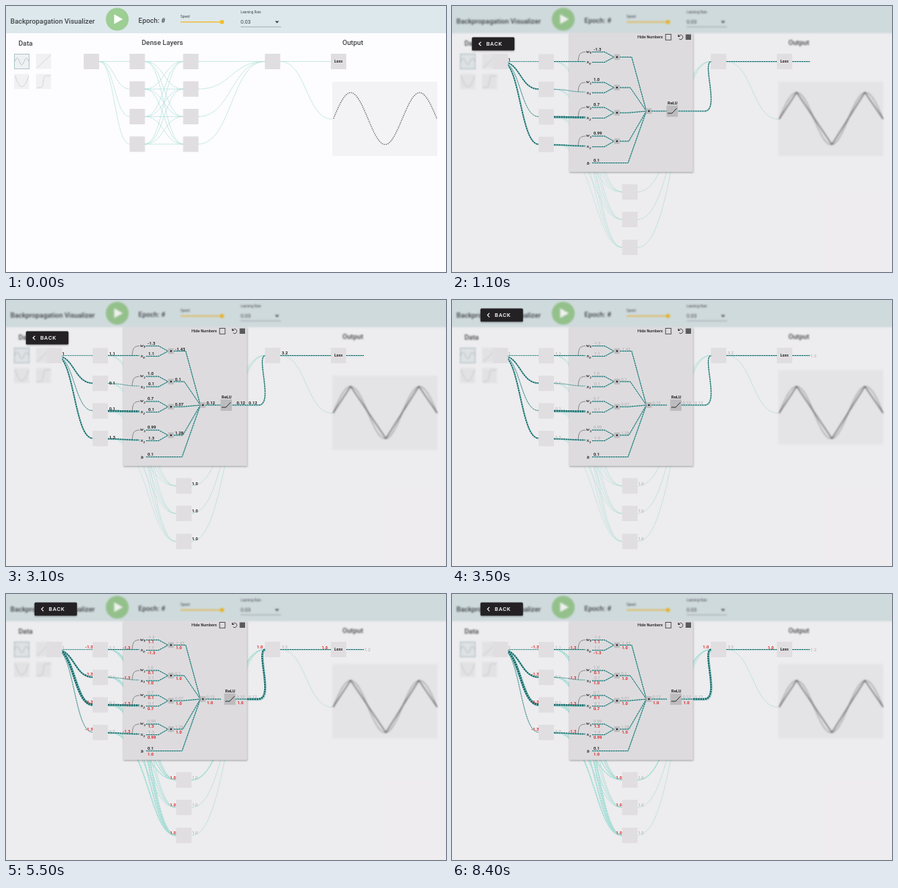
An HTML page that plays this animation: 600 px wide and 362 px high, repeating every 8.5 s.

```html
<!DOCTYPE html>
<html lang="en">
<head>
<meta charset="utf-8">
<title>Backpropagation Visualizer</title>
<style>
html, body { margin: 0; width: 100%; height: 100%; overflow: hidden; background: #fdfcfe; }
svg { position: absolute; left: 0; top: 0; width: 600px; height: 362px; overflow: visible; font-family: Roboto, sans-serif; }
text { fill: #414548; }
.h { font-size: 9.4px; font-weight: 500; }
.s { font-size: 4.5px; }
.n { font-size: 5.7px; font-weight: 700; fill: #222; }
.r { fill: #dc2727; }
.late .v { fill: #aaaaac; font-weight: 400; }
.m { font: italic 700 7px "Liberation Serif", serif; fill: #222; }
</style>
</head>
<body>
<svg id="page" viewBox="0 0 600 362"></svg>
<svg id="stage" viewBox="0 0 600 362"></svg>
<script>
const LOOP = 8500, ZOOM = 1100, BACKWARD = 3500;
const page = document.getElementById('page');
const stage = document.getElementById('stage');
const timed = [];

function add(parent, tag, attrs = {}, from = 0, to = LOOP) {
  const el = document.createElementNS('http://www.w3.org/2000/svg', tag);
  for (const k in attrs) el.setAttribute(k, attrs[k]);
  parent.append(el);
  if (from > 0 || to < LOOP) timed.push({ el, from, to });
  return el;
}
const group = (p, from, to) => add(p, 'g', {}, from, to);
const rect = (p, x, y, width, height, fill, more) => add(p, 'rect', { x, y, width, height, fill, ...more });
const path = (p, d, stroke, w = .8, more) => add(p, 'path', { d, stroke, 'stroke-width': w, fill: 'none', ...more });
const shape = (p, d, fill) => add(p, 'path', { d, fill });
function text(p, x, y, s, cls, from, to) {
  const el = add(p, 'text', { x, y, class: cls }, from, to);
  el.textContent = s;
  return el;
}
const node = (p, x, y, more) => rect(p, x - 10.5, y - 10.5, 21, 21, '#e0dee1', more);
const link = (x1, y1, x2, y2, m = (x1 + x2) / 2) => `M${x1} ${y1}C${m} ${y1} ${m} ${y2} ${x2} ${y2}`;
const faint = (p, d, w = .7) => path(p, d, '#a5ddd6', w, { 'stroke-dasharray': '3 .6' });
function wire(p, d, w = 1.1) {
  const shift = .3 + .3 * w;
  path(p, d, '#b3d6d5', w, { transform: `translate(${shift} ${shift})` });
  path(p, d, '#84bfbd', w);
  path(p, d, '#17696a', w, { 'stroke-dasharray': '2.2 1' });
}
function curve(f, x0, x1, steps) {
  return 'M' + Array.from({ length: steps + 1 }, (_, i) => {
    const x = x0 + (x1 - x0) * i / steps;
    return x.toFixed(2) + ' ' + f(x).toFixed(2);
  }).join('L');
}

// Page: header, data thumbnails, chart
rect(page, -5, -5, 610, 42, '#dde8ec');
text(page, 6, 23.8, 'Backpropagation Visualizer', 'h');
add(page, 'circle', { cx: 151.7, cy: 18, r: 15.6, fill: '#9dce94' });
shape(page, 'M147.5 11.2V24.6L159.3 17.9Z', '#fff');
text(page, 180.6, 23, 'Epoch: #', 'h');
text(page, 238, 15.5, 'Speed', 's');
path(page, 'M238 21.7H295', '#f0c040', 1.4);
add(page, 'circle', { cx: 294.5, cy: 21.7, r: 2.8, fill: '#f3bd2b' });
text(page, 320, 10.2, 'Learning Rate', 's');
text(page, 320, 24.2, '0.03', '').style.fontSize = '7px';
path(page, 'M320 28.4H375', '#858b8e', .6);
shape(page, 'M366.8 20.6H372.4L369.6 23.5Z', '#444');
text(page, 17, 54, 'Data', 'h');
text(page, 185, 53.3, 'Dense Layers', 'h');
text(page, 458.7, 53.3, 'Output', 'h');
for (const [x, y] of [[11, 65], [41, 65], [11, 92.5], [41, 92.5]])
  rect(page, x, y, 20.5, 20.5, '#f1f0f2');
rect(page, 11.4, 65.4, 20.2, 20.2, '#edf1f3', { stroke: '#a3bcc2', 'stroke-width': .8 });
const thin = '#c3c2c5';
path(page, curve(x => 75.5 - 4.5 * Math.sin((x - 12) / 19 * 3 * Math.PI), 12, 31, 30), '#a9b2b6', .7);
path(page, 'M42 84.5L61 66.5', thin, .6);
path(page, 'M12.5 95Q21.5 125 31 95', thin, .6);
path(page, 'M42 111H47C52 111 50 95 54 95H61', thin, .6);

const plot = rect(page, 445, 103, 143, 101, '#f3f2f4');
const sine = x => 153.2 - 35.3 * Math.sin((x - 446.5) / 47 * Math.PI);
path(page, curve(sine, 446.5, 587.5, 100), '#69686c', 1.3, { 'stroke-dasharray': '1.4 1.2' });
const fit = group(page, 600);
path(fit, 'M446 154L470 117.5L518 188.5L563 117.5L588 154', '#222', 1);

const veil = rect(stage, 0, 0, 600, 362, 'rgba(25,15,25,.065)');
timed.push({ el: veil, from: ZOOM, to: LOOP });

const ys = [75.5, 113, 150.5, 188];

// Overview network
const over = group(stage, 0, ZOOM);
for (const a of ys) {
  faint(over, link(127, 75.5, 169, a));
  for (const b of ys) faint(over, link(189, a, 242, b));
  faint(over, link(262, a, 353, 75.5));
}
faint(over, link(374, 75.5, 443, 75.5));
faint(over, link(374, 75.5, 445, 154));
const hover = group(over, 1000, ZOOM);
for (const d of [...ys.map(y => link(189, y, 242, 75.5)), link(262, 75.5, 353, 75.5)])
  path(hover, d, '#2b8583', 1, { 'stroke-dasharray': '2.6 1' });
node(over, 116.5, 75.5);
for (const y of ys) { node(over, 179, y); node(over, 252, y); }
node(over, 363.5, 75.5);

const nums = group(over, 600, ZOOM);
faint(nums, 'M464 75.5H487');
text(nums, 127.5, 74.3, '1', 'n');
['1.1', '0.1', '0.1', '1.3'].forEach((s, i) => {
  const y = ys[i] - .7;
  text(nums, 159, y, '-1.3', 'n r');
  text(nums, 190, y + .3, s, 'n');
  text(nums, i ? 233.5 : 231.5, y, i ? '1.0' : '-1.3', 'n r');
  text(nums, 263, y + .3, i ? '1.0' : '0.12', 'n');
});
text(nums, 342, 74.5, '1.0', 'n r');
text(nums, 374, 74.5, '3.2', 'n');
text(nums, 433, 74.3, '1.0', 'n r');
text(nums, 489, 77.5, '1.2', 'n');

const tip = group(over, 1000, ZOOM);
node(tip, 252, 75.5, { stroke: '#555b5e', 'stroke-width': 1 });
shape(tip, 'M227 57H278.5V66.5H255L252 69.5L249 66.5H227Z', '#cbcacd');
text(tip, 229, 63.7, 'CLICK TO ZOOM', 'n').style.letterSpacing = '.35px';
const cursor = group(over, 700, ZOOM);
shape(cursor, 'M0 0L8.2 3.4L5.3 4.8L8.3 8L6.8 9.4L3.9 6.1L2.4 8.8Z', '#111');

// Zoomed network
const zoom = group(stage, ZOOM);
const lower = [253, 290.5, 328.5], lx = 242.5;
const drop = (a, y) => link(139, a, lx - 10.5, y, 194);
const rise = y => link(lx + 10.5, y, 353, 75.5);
for (const y of lower) {
  for (const a of ys) faint(zoom, drop(a, y), .55);
  faint(zoom, rise(y));
}
const lowerBack = group(zoom, 5200);
[1.1, .6, 1.8].forEach((w, i) => {
  for (const a of ys) faint(lowerBack, drop(a, lower[i]), w);
});
faint(lowerBack, rise(253), 1.5);
faint(zoom, link(374, 75.5, 445, 154));
const inFwd = group(zoom, 0, 5300), inBack = group(zoom, 5300);
ys.forEach((y, i) => {
  const d = link(68, 75.5, 118, y);
  wire(inFwd, d, [.6, 1.5, .6, 1.6][i]);
  wire(inBack, d, [.6, 2, 3.2, .6][i]);
  text(inBack, 108, y - 1.8, '-1.3', 'n r');
});
for (const y of [75.5, ...lower]) node(zoom, y == 75.5 ? 66 : lx, y);
for (const y of ys) node(zoom, 128.5, y + .4);
node(zoom, 363.5, 75.5);
wire(zoom, 'M374 75.5H443');
wire(zoom, 'M464 75.5H488', 1);

rect(zoom, 160.3, 38, 168.8, 189, 'rgba(0,0,0,.3)', { style: 'filter:blur(1px)' });
rect(zoom, 160, 37, 168.7, 188.8, '#dddbde');

// y of node, w line, x line, product; bend x; w, x and product values
const rows = [
  [75.5, 62.5, 76.5, 69.5, 245, '-1.3', '1.1', '-1.43'],
  [113.5, 104, 118, 111, 243, '1.0', '0.1', '0.1'],
  [151, 138, 152.5, 145.3, 240, '0.7', '0.1', '0.07'],
  [189, 177, 191.5, 184, 241, '0.99', '1.3', '1.28'],
];
const box = (x, y) => {
  rect(zoom, x - 3.8, y - 3.8, 7.6, 7.6, '#bdbcbe');
  add(zoom, 'circle', { cx: x, cy: y, r: 1.2, fill: '#222' });
};
function symbol(x, y, s, sub = '') {
  const el = text(zoom, x, y, s, 'm');
  const low = add(el, 'tspan', { dy: 1.5, 'font-size': 5 });
  low.textContent = sub;
}
rows.forEach(([n, w, x, m, bend, wv, xv, mv], i) => {
  wire(zoom, link(139, n, 181.5, x - 1), [1.2, .5, 2.5, 1.5][i]);
  path(zoom, `M172 ${x - 1}C173 ${w + 3} 174 ${w + .5} 182 ${w}`, '#555', .6);
  symbol(183, w + 1.3, 'w', i);
  symbol(183.5, x + 1.6, 'x', i);
  wire(zoom, `M191 ${w}H208L221 ${m}`, 1);
  wire(zoom, `M191 ${x}H208L221 ${m}`, 1);
  wire(zoom, `M229 ${m}H${bend}L265 143`, 1);
  box(225, m);
  text(zoom, 193, w - 2, wv, 'n v');
  text(zoom, 194, x - 1.6, xv, 'n v', 1700);
  text(zoom, 140.8, n + [-.5, 1.8, -1, 0][i], xv, 'n v', 1700);
  text(zoom, 230.5, m - 1, mv, 'n v', 2000);
  text(zoom, 193.5, w + 4.7, xv, 'n r', 4800);
  text(zoom, 193, x + 5.3, wv, 'n r', 4800);
  text(zoom, 231.5, m + 5.6, '1.0', 'n r', 4600);
  text(zoom, 159, n + (i == 1 ? 2 : -.5), '-1.3', 'n r', 5000);
});
symbol(184, 215.5, 'b');
text(zoom, 193, 212, '0.1', 'n');
text(zoom, 193, 220, '1.0', 'n r', 4600);
wire(zoom, 'M191 213.5H240L265 143', 1);
wire(zoom, 'M272 143H293', 1);
const climb = 'H344C366 143 340 76 353.5 75.5';
wire(zoom, 'M306 143' + climb);
wire(group(zoom, 4100), 'M329 143' + climb, 2.3);
box(268.5, 143);
const relu = group(zoom);
rect(relu, 292.5, 135.3, 15.5, 15.5, '#bcbbbd');
path(relu, 'M294 146H300L306.5 139.2', '#222', .9);
text(relu, 294, 133.8, 'ReLU', 'n');

text(zoom, 76.5, 74.5, '1', 'n v');
text(zoom, 273.5, 141.5, '0.12', 'n v', 2300);
text(zoom, 314.5, 141.5, '0.12', 'n v', 2600);
text(zoom, 331, 141.5, '0.12', 'n v', 2600);
for (const y of lower) {
  text(zoom, 253.5, y - 1.5, '1.0', 'n v', 2600);
  text(zoom, 223.5, y - 1.5, '1.0', 'n r', 5200);
}
text(zoom, 376, 74, '3.2', 'n v', 2900);
text(zoom, 489, 77.8, '1.2', 'n v', 3300);
text(zoom, 430.5, 74.5, '1.0', 'n r', 3800);
text(zoom, 342, 74, '1.0', 'n r', 4100);
text(zoom, 315.5, 150, '1.0', 'n r', 4300);
text(zoom, 274, 150, '1.0', 'n r', 4500);

// Panel controls
text(zoom, 253, 44.3, 'Hide Numbers', 'n').style.cssText = 'font-size:5.4px;font-weight:500';
rect(zoom, 291.2, 38.6, 7.6, 7.6, 'none', { stroke: '#333', 'stroke-width': .8 });
path(zoom, 'M309.4 40.5A3.1 3.1 0 1 1 309.7 44.8', '#444', .9);
shape(zoom, 'M308 38.5V42H311.5Z', '#444');
rect(zoom, 318.6, 38.6, 7.4, 7.4, '#5a595c');

const back = group(zoom);
rect(back, 0, 1, 58, 18, 'rgba(0,0,0,.35)', { rx: 1.5, style: 'filter:blur(1px)' });
rect(back, 0, 0, 58, 18, '#242124', { rx: 1.5 });
path(back, 'M12.3 6.3L9.6 9L12.3 11.7', '#fff', 1.1);
text(back, 19.5, 11.8, 'BACK', '').style.cssText =
  'fill:#fff;font-size:7.5px;font-weight:500;letter-spacing:.65px';

// The loss node is in both views
node(stage, 453.5, 75.5);
text(stage, 447.8, 77.4, 'Loss', 'n').style.fontSize = '5.2px';

function draw(t) {
  for (const { el, from, to } of timed)
    el.style.display = t >= from && t < to ? '' : 'none';
  const late = t >= BACKWARD;
  page.style.filter = t >= ZOOM ? 'blur(1px)' : 'none';
  zoom.setAttribute('class', late ? 'late' : '');
  plot.setAttribute('y', late ? 95.5 : 103);
  relu.setAttribute('transform', `translate(${late ? 5 : 0})`);
  back.setAttribute('transform', late ? 'translate(38.8 11.6)' : 'translate(27.2 42.5)');
  const k = (1 - Math.min(1, Math.max(0, (t - 700) / 300))) ** 2;
  cursor.setAttribute('transform', `translate(${250 + 40 * k} ${71.3 + 60 * k})`);
}
function tick() {
  draw(performance.now() % LOOP);
  requestAnimationFrame(tick);
}
tick();
</script>
</body>
</html>
```
